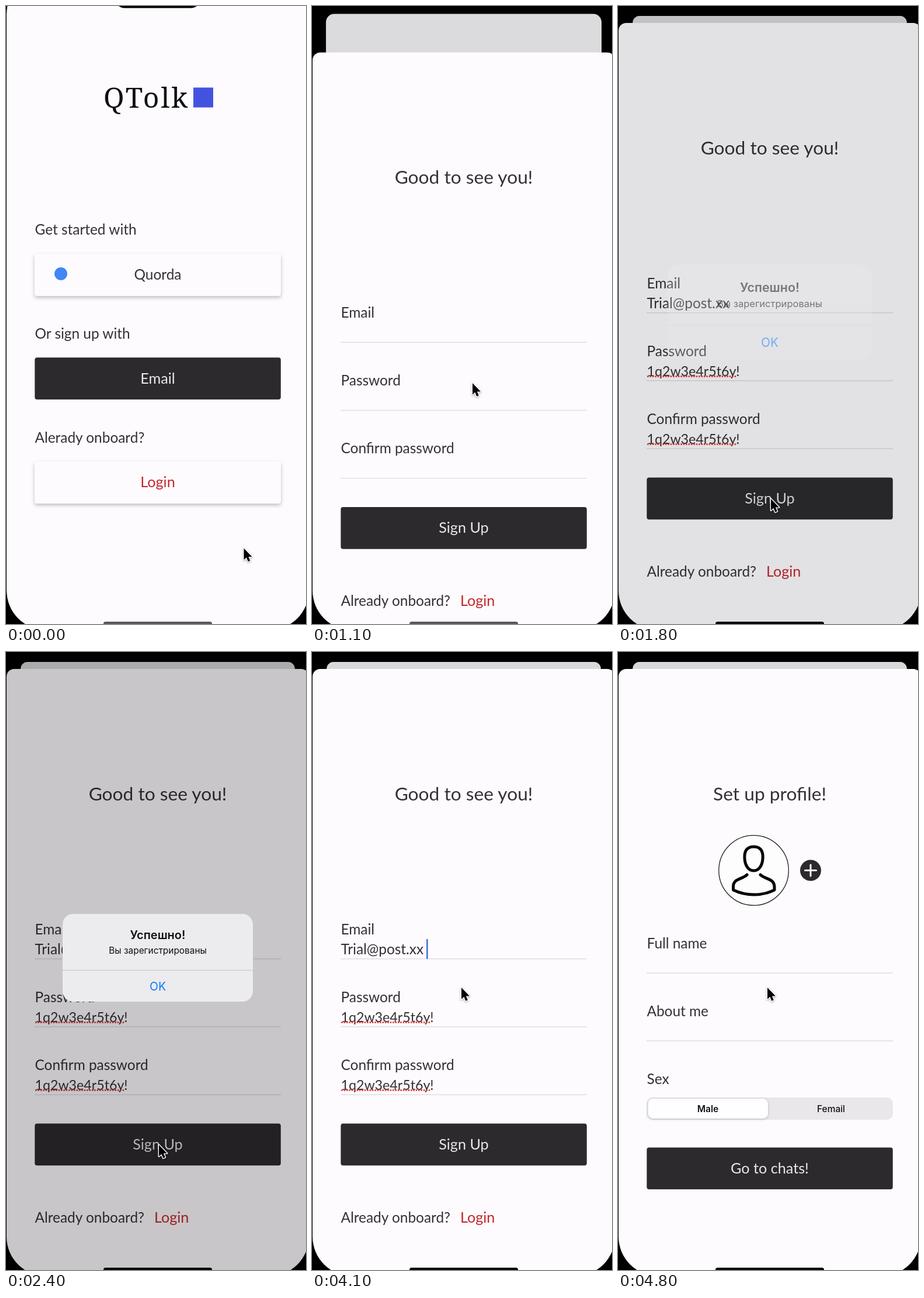
Animation of 514 by 1057 pixels, one loop 4.9 s. Source, as an HTML page:

```html
<!DOCTYPE html>
<html lang="en">
<head>
<meta charset="utf-8">
<title>Sign up flow</title>
<style>
  html, body { margin: 0; width: 100%; height: 100%; overflow: hidden; background: #000; }
  svg { display: block; width: 100%; height: 100%; }
  text { font: 24.4px Lato, "Open Sans", sans-serif; fill: #333135; white-space: pre; }
  .mid { text-anchor: middle; }
  .title { font-size: 31.7px; }
  .button { font-size: 25.2px; }
  .brand { font: 48px "Noto Serif", serif; fill: #111; letter-spacing: 3px; }
  .light { fill: #e9e7ea; }
  .red { fill: #c4282c; }
  .secret { font-size: 23.2px; }
  .paper { fill: #fdfbfe; }
  .dark { fill: #2c2a2d; }
  .card { fill: #fdfbfe; filter: drop-shadow(0 3px 3px rgba(0, 0, 0, .24)); }
  .line { stroke: #dfdde0; stroke-width: 1.4; }
  .typo { stroke: #e0302c; stroke-width: 2.6; stroke-dasharray: 2.6 1.8; }
  .pen { fill: none; stroke: #050505; stroke-width: 5; stroke-linecap: round; stroke-linejoin: round; }
  .ui text { font-family: Inter, Roboto, sans-serif; fill: #111; }
</style>
</head>
<body>
<svg viewBox="0 0 514 1057" preserveAspectRatio="none">
  <defs>
    <clipPath id="screen"><rect x="1" y="-54" width="518" height="1121" rx="67"/></clipPath>
  </defs>
  <rect width="514" height="1057"/>

  <g clip-path="url(#screen)">
    <g id="welcome">
      <rect class="paper corner" x="1" y="-54" width="518" height="1121"/>
      <text class="brand" x="167" y="174">QTolk</text>
      <rect x="321" y="139.500" width="34" height="34" fill="#4453de"/>
      <text x="49.500" y="391">Get started with</text>
      <rect class="card" x="49" y="424" width="422" height="72" rx="4"/>
      <circle cx="94" cy="458" r="11" fill="#4285f4"/>
      <text class="mid" x="260" y="468">Quorda</text>
      <text x="49.500" y="569">Or sign up with</text>
      <rect class="dark" x="49.300" y="601.300" width="421.500" height="71.700" rx="4"/>
      <text class="mid light button" x="260" y="645.500">Email</text>
      <text x="49.500" y="746.500">Alerady onboard?</text>
      <rect class="card" x="49" y="779" width="422" height="72" rx="4"/>
      <text class="mid red button" x="260" y="823">Login</text>
      <rect id="welcomeDim" class="corner" x="1" y="-54" width="518" height="1121"/>
    </g>

    <g id="signup">
      <rect class="paper" x="1" y="29" width="518" height="1120" rx="13"/>
      <text class="mid title" x="260" y="254">Good to see you!</text>
      <text x="49.500" y="483">Email</text>
      <text x="49.500" y="599">Password</text>
      <text x="49.500" y="715">Confirm password</text>
      <path class="line" d="M49 524.800H471M49 641H471M49 757.200H471"/>
      <g id="filled">
        <text x="49.500" y="517">Trial@post.xx</text>
        <text class="secret" x="49.500" y="633">1q2w3e4r5t6y!</text>
        <text class="secret" x="49.500" y="749">1q2w3e4r5t6y!</text>
        <path class="typo" d="M50 633.500H203M50 749.500H203"/>
      </g>
      <rect id="caret" x="196" y="491" width="2.600" height="34" fill="#3f74d6"/>
      <rect class="dark" x="49.300" y="806.500" width="421.500" height="71.700" rx="4"/>
      <text class="mid light button" x="260" y="851">Sign Up</text>
      <text x="49.500" y="976">Already onboard?</text>
      <text class="red button" x="254" y="976">Login</text>
      <rect id="signupDim" x="1" y="29" width="518" height="1120" rx="13"/>
    </g>

    <g id="profile">
      <rect class="paper" x="1" y="29" width="518" height="1120" rx="13"/>
      <text class="mid title" x="260" y="254">Set up profile!</text>
      <circle cx="232.500" cy="373.500" r="59.800" fill="#fefdfe" stroke="#1c1c1c" stroke-width="1.300"/>
      <path class="pen" d="M232.500 333C246 333 249 343 248 354C247 366 241 374 232.500 374C224 374 218 366 217 354C216 343 219 333 232.500 333Z"/>
      <path class="pen" d="M221 381C213 389 198 387 197.500 401V407Q214 415 233 415Q252 415 268 407V401C267 387 252 389 244 381"/>
      <g id="plus">
        <circle class="dark" cx="330" cy="373.500" r="18"/>
        <path d="M320.500 373.500H339.500M330 364V383" stroke="#fdfbfe" stroke-width="3" stroke-linecap="round"/>
      </g>
      <text x="49.500" y="507">Full name</text>
      <text x="49.500" y="623">About me</text>
      <text x="49.500" y="739">Sex</text>
      <path class="line" d="M49 549H471M49 665.200H471"/>
      <rect x="49" y="762" width="422" height="38" rx="10" fill="#e9e7ea"/>
      <rect x="51.500" y="764" width="205.500" height="34" rx="8.500" fill="#fefdff" style="filter:drop-shadow(0 1.500px 2px rgba(0,0,0,.22))"/>
      <g class="ui mid">
        <text x="154" y="787" style="font-size:15.500px;font-weight:600">Male</text>
        <text x="365" y="787" style="font-size:15.500px;font-weight:500">Femail</text>
      </g>
      <rect class="dark" x="49.300" y="847.500" width="421.500" height="71.500" rx="4"/>
      <text class="mid light button" x="260" y="892">Go to chats!</text>
    </g>

    <rect id="shade" width="514" height="1057"/>
    <g id="alert" class="ui mid">
      <g id="alertBox">
        <rect x="97" y="448" width="326" height="150" rx="18" fill="#ecebed"/>
        <path d="M97 544.300H423" stroke="#cccace" stroke-width="1.300"/>
      </g>
      <g id="alertText">
        <text x="260" y="491" style="font-size:20px;font-weight:600">Успешно!</text>
        <text x="260" y="515.500" style="font-size:15.400px">Вы зарегистрированы</text>
        <text x="260" y="579" style="font-size:19.500px;fill:#0a7aff">OK</text>
      </g>
    </g>
    <rect id="home" x="167" y="1053" width="186" height="7" rx="3.500"/>
  </g>

  <rect x="187" y="-40" width="146" height="43.500" rx="16"/>
  <path id="cursor" d="M0 0V19.800L4.400 15.700L7.300 22.800L10.800 21.300L7.900 14.400H14Z"
    stroke="#fff" stroke-width="2.800" paint-order="stroke" stroke-linejoin="round"
    style="filter:drop-shadow(0 1.500px 1.500px rgba(0,0,0,.35))"/>
</svg>

<script>
const LOOP = 4900, STEP = 100;
const TRAVEL = 1028;   // distance a sheet rises
const SHRINK = 0.093;  // how far the screen behind a sheet scales down
const DIM = 0.14;

const el = {};
document.querySelectorAll('[id]').forEach(n => el[n.id] = n);
const corners = document.querySelectorAll('.corner');

const clamp = x => Math.min(1, Math.max(0, x));
const mix = (a, b, k) => a + (b - a) * k;
const span = (t, from, to) => clamp((t - from) / (to - from));
const smooth = u => u * u * (3 - 2 * u);
const easeOut = u => 1 - (1 - u) ** 3;
const set = (node, name, value) => node.setAttribute(name, value);
const show = (node, on) => set(node, 'visibility', on ? 'visible' : 'hidden');

// Critically damped spring, settling exactly on 1.
function spring(ms) {
  if (ms <= 0) return 0;
  const x = ms * 0.01257;
  return 1 - Math.max(0, ((1 + x) * Math.exp(-x) - 0.004) / 0.996);
}

// Shrinks a screen around the centre line and shifts it vertically.
function recede(node, k, dy) {
  const s = 1 - SHRINK * k;
  set(node, 'transform', `translate(${260 * (1 - s)} ${dy}) scale(${s})`);
}

function cursorAt(t) {
  if (t < 1600) {
    const k = smooth(span(t, 100, 600));
    return [mix(407.5, 275, k), mix(927.5, 645, k)];
  }
  const k = smooth(span(t, 2500, 3200));
  return [mix(262, 256, k), mix(843, 574, k)];
}

function draw(t) {
  const first = spring(t - 728), second = spring(t - 4176);

  recede(el.welcome, first, 66 * first + 12 * second);
  corners.forEach(n => set(n, 'rx', mix(67, 13, first)));
  set(el.welcomeDim, 'opacity', DIM * first);

  if (second > 0) recede(el.signup, second, -9.3 * second);
  else set(el.signup, 'transform', `translate(0 ${TRAVEL * (1 - first)})`);
  set(el.signupDim, 'opacity', DIM * second);
  show(el.signup, first > 0);
  show(el.filled, t >= 1600);
  show(el.caret, t >= 3700);

  set(el.profile, 'transform', `translate(0 ${TRAVEL * (1 - second)})`);
  show(el.profile, second > 0);
  set(el.plus, 'opacity', mix(0.8, 1, span(t, 4400, 4700)));

  const enter = easeOut(span(t, 1720, 2100));
  const k = enter * (1 - smooth(span(t, 3700, 4100)));
  const zoom = mix(1.15, 1, enter);
  set(el.shade, 'opacity', 0.21 * k);
  set(el.alertBox, 'opacity', k * k);
  set(el.alertText, 'opacity', k);
  set(el.alert, 'transform', `translate(260 523) scale(${zoom}) translate(-260 -523)`);

  set(el.home, 'fill', t < 1600 ? '#5a585b' : '#050505');
  set(el.cursor, 'transform', `translate(${cursorAt(t)})`);
}

function tick() {
  const t = performance.now() % LOOP;
  draw(Math.floor(t / STEP) * STEP);
  requestAnimationFrame(tick);
}
tick();
</script>
</body>
</html>
```
